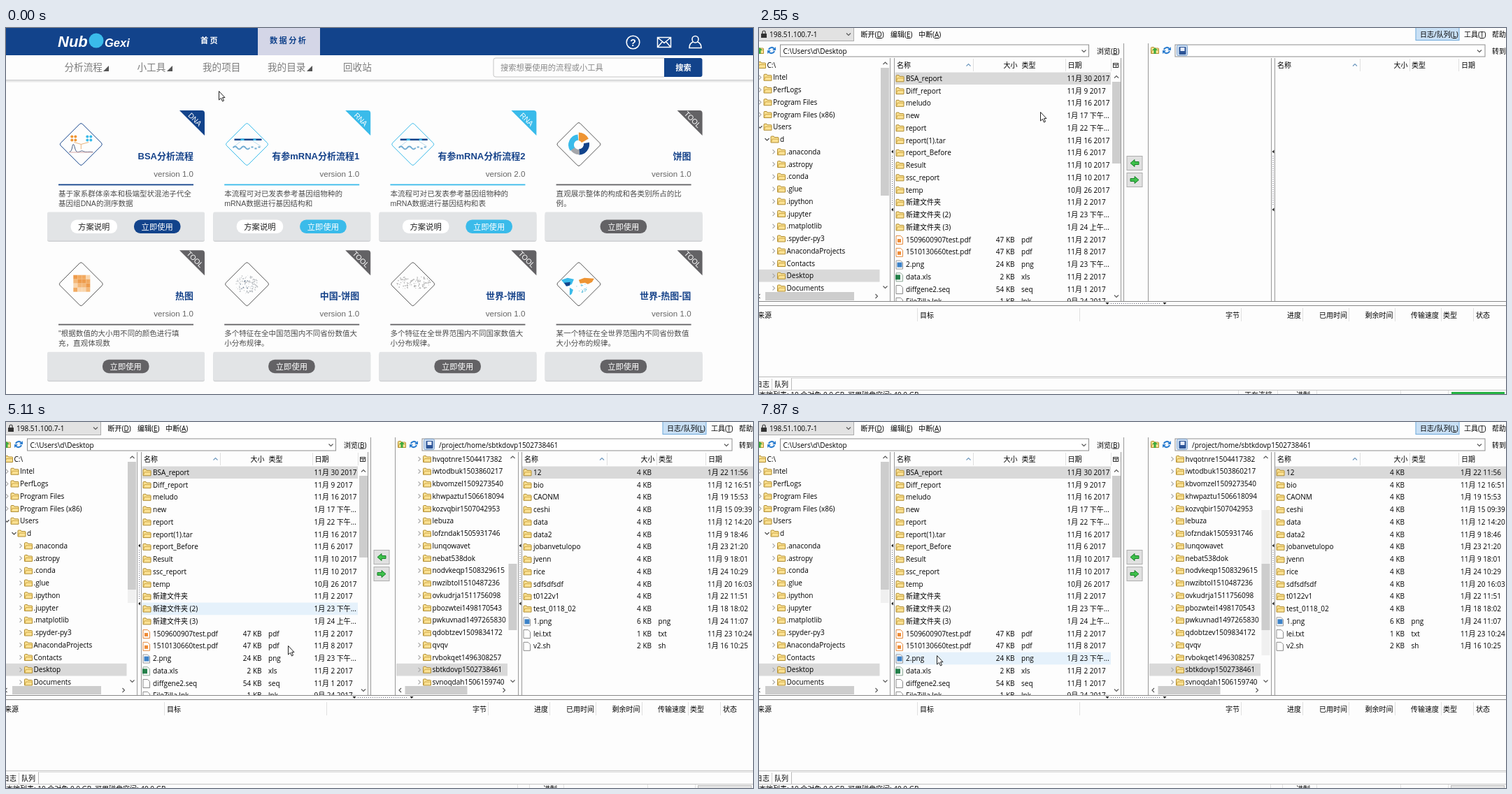
An HTML page for the animation above (8 s loop, 1068 by 524 pixels).

```html
<!DOCTYPE html>
<html lang="zh-CN">
<head>
<meta charset="utf-8">
<title>数据传输</title>
<style>
html, body { margin: 0; width: 100%; height: 100%; overflow: hidden; background: #fdfdfd; }
svg { display: block; width: 100vw; height: 100vh; }
text { white-space: pre; }
#portal { font-family: "Liberation Sans", "Noto Sans CJK SC", "Noto Sans CJK", sans-serif; }
#blank, #client { font: 10px "Open Sans", "Noto Sans CJK SC", "Noto Sans CJK", sans-serif; fill: #000; }
.end { text-anchor: end; }
.mid { text-anchor: middle; }
.key { text-decoration: underline; }
.tab { font-size: 11.2px; font-weight: 700; letter-spacing: 2.4px; }
.nav { font-size: 13.6px; fill: #7c7c7c; }
.logo { font-weight: 700; font-style: italic; fill: #fff; }
.title { font-size: 13px; font-weight: 700; fill: #16438a; text-anchor: end; }
.version { font-size: 11.6px; fill: #666; text-anchor: end; }
.desc { font-size: 10.55px; fill: #4c4c4c; }
.button { font-size: 11.3px; text-anchor: middle; }
.item { font-size: 13px; fill: #1b4a92; }
.badge { font-size: 10.5px; fill: #fff; text-anchor: middle; }
</style>
</head>
<body>
<svg id="stage" viewBox="0 0 1068 524" preserveAspectRatio="none"></svg>
<script>
const LOOP = 8000;
const NAVY = '#12438b', SKY = '#3abbea', GREY = '#636265', ORANGE = '#ee9433';
const EDGE = '#cfcfcf', THUMB = '#cdcdcd', SELECTED = '#d9d9d9', HOVER = '#e5f1fb';

// Markup helpers
const text = (x, y, s, cls = '', extra = '') => `<text x="${x}" y="${y}" class="${cls}" ${extra}>${s}</text>`;
const rect = (x, y, w, h, fill, extra = '') => `<rect x="${x}" y="${y}" width="${w}" height="${h}" fill="${fill}" ${extra}/>`;
const box = (x, y, w, h, fill, stroke, r = 0) => rect(x + .5, y + .5, w, h, fill, `stroke="${stroke}" rx="${r}"`);
const path = (d, stroke, width = 1, fill = 'none', extra = '') =>
  `<path d="${d}" fill="${fill}" stroke="${stroke}" stroke-width="${width}" ${extra}/>`;
const shape = (d, fill) => path(d, 'none', 0, fill);
const dotted = d => path(d, '#667', 1, 'none', 'stroke-dasharray="1 2"');
const dot = (x, y, r, fill) => `<circle cx="${x}" cy="${y}" r="${r}" fill="${fill}"/>`;
const vline = (x, y1, y2, color = EDGE) => rect(x, y1, 1, y2 - y1, color);
const hline = (x1, x2, y, color = EDGE) => rect(x1, y, x2 - x1, 1, color);
const move = (x, y, s) => `<g transform="translate(${x} ${y})">${s}</g>`;
const use = (id, x, y) => `<use href="#${id}" x="${x}" y="${y}"/>`;
const during = (on, off, s) => `<g data-on="${on}" data-off="${off}">${s}</g>`;
const range = n => [...Array(n).keys()];

function random(seed) {
  return () => (seed = (seed * 16807) % 2147483647) / 2147483647;
}

// Portal
function scatter(n, rx, ry, seed, color) {
  const next = random(seed);
  return range(n).map(() => {
    const a = next() * 6.283, r = Math.sqrt(next());
    return dot((rx * r * Math.cos(a)).toFixed(1), (ry * r * Math.sin(a)).toFixed(1), (.4 + next() * .6).toFixed(1), color);
  }).join('');
}

const quad = (x, color) => range(4).map(i => dot(x + i % 2 * 5, -11 + (i >> 1) * 5, 2, color)).join('');
const icons = {
  peak: () => quad(-13, ORANGE) + quad(9, SKY) +
    path('M-10-3 0 0 11-3M0 0V7', '#e8b27c') +
    path('M-17 11C-12 11-13 0-11 0S-9 11-5 11C0 11 0 8 3 10S12 10 17 11', '#4a6087') + hline(-17, 17, 11, '#d5a9a9'),
  strand: () => rect(-18, -8, 39, 2.5, NAVY) + rect(-9, -8, 5, 2.5, SKY) + rect(9, -8, 4, 2.5, SKY) +
    path('M-8-5-18 3M8-5 20 3', '#bcdcec') +
    path('M-20 5q3-4 6 0t6 0 6 0 6 0M6 4h3m2 2h3m2-2h3', '#71acd2', 2),
  pie: () => path('M11-2A11 11 0 0 1 0 11', NAVY, 8) + path('M1 11A11 11 0 0 1-9 6', '#a4a6aa', 7) +
    path('M-9 7A11 11 0 0 1-1-10', SKY, 8) + shape('M0 0V-17A17 17 0 0 1 14-8Z', ORANGE) + dot(-1, 0, 5.5, '#fdfdfd'),
  heat: () => range(16).map(i => rect(-11 + i % 4 * 6, -13 + (i >> 2) * 6, 6, 6,
    ['#ee9c4c', '#f4b878', '#f9d6ae', '#f2aa60'][(i * 7 + (i >> 2) * 3 + (i >> 1)) % 4])).join(''),
  region: () => scatter(95, 16, 14, 71, '#b8bcc0') + scatter(12, 11, 10, 8, '#65778d'),
  world: () => move(-13, -2, scatter(48, 10, 9, 14, '#b9b9b9')) + move(10, -2, scatter(80, 15, 9, 25, '#b5b5b5')),
  shaded: () => shape('M-25-6l9-3 9 2-3 7-6 3-5-4z', SKY) + shape('M-21-2l9-1-1 5-5 1z', NAVY) +
    shape('M-13 5l5 3-2 6-3 2z', SKY) + shape('M0-6l8-3 14 1-3 5-6 3-4-2-7 1z', ORANGE) +
    move(3, 5, scatter(16, 9, 7, 44, '#6cc4df')),
};

const cards = [
  ['DNA', 'BSA分析流程', '1.0', '基于家系群体亲本和极端型状混池子代全', '基因组DNA的测序数据', 'peak'],
  ['RNA', '有参mRNA分析流程1', '1.0', '本流程可对已发表参考基因组物种的', 'mRNA数据进行基因结构和', 'strand'],
  ['RNA', '有参mRNA分析流程2', '2.0', '本流程可对已发表参考基因组物种的', 'mRNA数据进行基因结构和表', 'strand'],
  ['TOOL', '饼图', '1.0', '直观展示整体的构成和各类别所占的比', '例。', 'pie'],
  ['TOOL', '热图', '1.0', '"根据数值的大小用不同的颜色进行填', '充，直观体现数', 'heat'],
  ['TOOL', '中国-饼图', '1.0', '多个特征在全中国范围内不同省份数值大', '小分布规律。', 'region'],
  ['TOOL', '世界-饼图', '1.0', '多个特征在全世界范围内不同国家数值大', '小分布规律。', 'world'],
  ['TOOL', '世界-热图-国', '1.0', '某一个特征在全世界范围内不同省份数值', '大小分布的规律。', 'shaded'],
];
const kindColor = { DNA: NAVY, RNA: SKY, TOOL: GREY };

function pill(x, label, fill, color) {
  return rect(x, 156.5, 66.5, 19.5, fill, 'rx="9"') + text(x + 33.2, 171, label, 'button', `fill="${color}"`);
}

function card([kind, title, version, line1, line2, icon], i) {
  const color = kindColor[kind], tool = kind === 'TOOL', half = tool ? 32 : 31;
  const buttons = tool ? pill(79, '立即使用', color, '#fff')
    : pill(33.5, '方案说明', '#fff', '#222') + pill(124, '立即使用', color, '#fff');
  const diamond = `M-2-${half - 2}q2-2 4 0L${half - 2}-2q2 2 0 4L2 ${half - 2}q-2 2-4 0L-${half - 2} 2q-2-2 0-4Z`;
  return move(59 + i % 4 * 237.2, 118 + (i >> 2) * 200.2,
    rect(0, 147, 225, 41, '#cfd1d3', 'rx="3"') + rect(0, 145.5, 225, 41, '#e2e4e6', 'rx="2"') +
    shape('M189 0H221q4 0 4 4V36Z', color) +
    text(211, 16.5, kind, 'badge', 'transform="rotate(45 211 13)"') +
    move(48.3, 48.5, path(diamond, tool ? '#555' : color) + icons[icon]()) +
    text(209, 70, title, 'title') + text(209, 95, 'version ' + version, 'version') +
    rect(16, 105.5, 193, 1.8, color) +
    text(16, 122.7, line1, 'desc') + text(16, 137.2, line2, 'desc') + buttons);
}

function portal() {
  const nav = [[83.5, '分析流程', 139], [187.5, '小工具', 230], [281, '我的项目'], [374, '我的目录', 430], [482, '回收站']];
  return rect(0, 0, 1068, 524, '#fdfdfd') +
    rect(0, 74, 1068, 1.5, '#cccdce') + rect(0, 75.5, 1068, 2, '#e8e8e8') +
    rect(0, 0, 1068, 39, NAVY) + rect(360, 0, 89, 39, '#d4d6e7') +
    text(74, 27, 'Nub', 'logo', 'font-size="22"') + dot(129, 18, 10.5, SKY) +
    text(141, 27, 'Gexi', 'logo', 'font-size="16.5"') +
    text(278, 22, '首页', 'tab', 'fill="#fff"') + text(377, 22, '数据分析', 'tab', `fill="${NAVY}"`) +
    `<circle cx="896.5" cy="20.5" r="9.3" fill="none" stroke="#fff" stroke-width="1.6"/>` +
    text(896.5, 25.5, '?', 'mid', 'fill="#fff" font-size="14" font-weight="700"') +
    path('M931.5 13.5h19v14h-19zl9.5 8 9.5-8M931.5 27.5l7-8M950.5 27.5l-7-8', '#fff', 1.5) +
    path('M981 16a4.5 4.5 0 1 1 9 0a4.5 5 0 1 1-9 0M982 20q-5 2-5 8.5h17q0-6.5-5-8.5', '#fff', 1.6) +
    nav.map(([x, s, tri]) => text(x, 61, s, 'nav') + (tri ? shape(`M${tri} 62h8v-8z`, '#555') : '')).join('') +
    box(696.5, 42.5, 246, 27, '#fdfdfd', '#c6c6c6', 3) +
    text(707, 60.5, '搜索想要使用的流程或小工具', '', 'font-size="11.3" fill="#888"') +
    shape('M941 43h51.5q3 0 3 3v21q0 3-3 3H941z', NAVY) +
    text(968.5, 60.7, '搜索', 'button', 'fill="#fff" font-weight="700"') +
    cards.map(card).join('') +
    during(850, 1490, rect(351, 77, 106, 65, '#bbb', 'rx="4"') + box(348.5, 74, 106, 65, '#fdfdfd', '#d4d4d4', 4) +
      text(376, 96, '查看文件', 'item') + text(376, 129, '数据传输', 'item'));
}

// Transfer client
const PITCH = 17.75;
const treeY = i => 53 + i * PITCH;
const fileY = i => 72.3 + i * PITCH;

const turns = { right: 0, down: 90, left: 180, up: 270 };
const turned = (x, y, dir, s) => `<g transform="translate(${x} ${y}) rotate(${turns[dir]})">${s}</g>`;
const chevron = (x, y, dir, color = '#555') => turned(x, y, dir, path('M-1.5-3 1.5 0-1.5 3', color, 1.1));
const triangle = (x, y, dir) => turned(x, y, dir, shape('M-1.5-2.5 1.5 0-1.5 2.5Z', '#222'));

function treeRow(x, i, name, arrow = 'right') {
  const y = treeY(i);
  return chevron(x - 5, y, arrow, arrow === 'right' ? '#aaa' : '#444') + use('folder', x, y - 5) + text(x + 13.5, y + 3.6, name);
}

function fileRow(cols, [name, size, date], i) {
  const ext = name.split('.').pop(), y = fileY(i);
  const icon = size && name.includes('.') ? { pdf: 'pdf', png: 'png', xls: 'xls' }[ext] || 'doc' : 'folder';
  const type = icon === 'folder' ? '' : ext;
  return use(icon, cols.icon, y - (icon === 'folder' ? 5 : 6)) + text(cols.icon + 14.5, y + 3.6, name) +
    text(cols.size, y + 3.6, size ? size + ' KB' : '', 'end') + text(cols.type, y + 3.6, type) + text(cols.date, y + 3.6, date);
}

const parseRows = s => s.trim().split('\n').map(line => line.trim().split('|'));
const localFiles = parseRows(`BSA_report||11月 30 2017
  Diff_report||11月 9 2017
  meludo||11月 16 2017
  new||1月 17 下午...
  report||1月 22 下午...
  report(1).tar||11月 16 2017
  report_Before||11月 6 2017
  Result||11月 10 2017
  ssc_report||11月 10 2017
  temp||10月 26 2017
  新建文件夹||11月 2 2017
  新建文件夹 (2)||1月 23 下午...
  新建文件夹 (3)||1月 24 上午...
  1509600907test.pdf|47|11月 2 2017
  1510130660test.pdf|47|11月 8 2017
  2.png|24|1月 23 下午...
  data.xls|2|11月 2 2017
  diffgene2.seq|54|11月 1 2017
  FileZilla.lnk|1|9月 24 2017`);
const remoteFiles = parseRows(`12|4|1月 22 11:56
  bio|4|11月 12 16:51
  CAONM|4|1月 19 15:53
  ceshi|4|11月 15 09:39
  data|4|11月 12 14:20
  data2|4|11月 9 18:46
  jobanvetulopo|4|1月 23 21:20
  jvenn|4|11月 9 18:01
  rice|4|1月 24 10:29
  sdfsdfsdf|4|11月 20 16:03
  t0122v1|4|1月 22 11:51
  test_0118_02|4|1月 18 18:02
  1.png|6|1月 24 11:07
  lei.txt|1|11月 23 10:24
  v2.sh|2|1月 16 10:25`);
const folders = `.anaconda .astropy .conda .glue .ipython .jupyter .matplotlib .spyder-py3
  AnacondaProjects Contacts Desktop Documents`.split(/\s+/);
const account = 'sbtkdovp1502738461';
const accounts = `hvqotnre1504417382 iwtodbuk1503860217 kbvomzel1509273540 khwpaztu1506618094 kozvqbir1507042953
  lebuza lofzndak1505931746 lunqowavet nebat538dok nodvkeqp1508329615 nwzibtol1510487236 ovkudrja1511756098
  pbozwtei1498170543 pwkuvnad1497265830 qdobtzev1509834172 qvqv rvbokqet1496308257 ${account} svnoqdah1506159740`.split(/\s+/);
const localCols = { icon: 195.5, size: 365.5, type: 375, date: 440.5 };
const remoteCols = { icon: 739.5, size: 923, type: 932.5, date: 1003 };

const menu = (x, y, label, key) => text(x, y, `${label}(<tspan class="key">${key}</tspan>)`);
const hover = (x, w, row, on, off) => during(on, off, rect(x, fileY(row) - 9, w, PITCH, HOVER));
const handle = x => triangle(x, 177, 'left') + triangle(x, 260, 'left') + dotted(`M${x} 183V255`);
const headers = (xs, y) => xs.map(([x, s, end]) => text(x, y, s, end ? 'end' : '')).join('');
const columns = (xs, y1, y2) => xs.map(x => vline(x, y1, y2, '#e0e0e0')).join('');

function toolbar() {
  return box(-2, -2, 137, 20, '#e2e2e2', '#adadad') + rect(3, 8, 8, 6, '#333') + path('M5 8V6a2 2 0 0 1 4 0v2', '#333', 1.2) +
    text(15, 13, '198.51.100.7-1') + chevron(128, 9, 'down') +
    menu(145.5, 13, '断开', 'D') + menu(188, 13, '编辑', 'E') + menu(228, 13, '中断', 'A') +
    box(938.5, -1, 62, 18, '#c9e0f5', '#6fa9db') + menu(945, 13, '日志/队列', 'L') +
    menu(1008, 13, '工具', 'T') + text(1048, 13, '帮助') +
    use('up', -5, 27) + use('refresh', 18, 32) + box(30, 23.5, 441, 17, '#fff', '#8d8d8d') +
    text(34.5, 36.5, 'C:\\Users\\d\\Desktop') + chevron(464.5, 33, 'down') + menu(483, 36.5, '浏览', 'B') +
    use('up', 560, 27) + use('refresh', 583, 32) + box(594.5, 23.5, 443, 17, '#fff', '#8d8d8d') +
    box(597, 24, 15, 15, '#cfe0f2', '#7da2ce', 2) + rect(600.5, 27, 10, 11, '#2d5597', 'rx="1"') + rect(602.5, 28, 6, 5, '#e8eefc') +
    chevron(1030, 33, 'down') + text(1048, 36.5, '转到');
}

function localTree() {
  return rect(0, treeY(17) - 9, 172.5, PITCH, SELECTED) +
    treeRow(-2, 0, 'C:\\', 'down') +
    ['Intel', 'PerfLogs', 'Program Files', 'Program Files (x86)'].map((s, i) => treeRow(6.5, i + 1, s)).join('') +
    treeRow(6.5, 5, 'Users', 'down') + treeRow(16.5, 6, 'd', 'down') +
    folders.map((s, i) => treeRow(26, i + 7, s)).join('') +
    rect(0, 378, 187, 13, '#fdfdfd') + rect(9, 378, 127, 12, THUMB) + chevron(0, 384, 'left') + chevron(168, 384, 'right') +
    during(4270, LOOP, rect(174, 240, 12, 19, '#f0f0f0')) +
    rect(174, 57, 12, 183, THUMB) + chevron(180.5, 50.5, 'up') + chevron(180.5, 371, 'down');
}

function localList() {
  const bar = (row, on, off) => hover(194.5, 308.5, row, on, off);
  return headers([[197, '名称'], [369.5, '大小', 1], [375.5, '类型'], [441.5, '日期']], 57) +
    chevron(299.5, 53, 'up', '#6b96bd') + columns([306, 438, 503], 44, 62) +
    box(506, 50, 7, 6, '#fff', '#333') + path('M507 52.5h7M510.5 52v5', '#333') +
    rect(505, 77, 12, 117, THUMB) + chevron(511, 70, 'up') + chevron(511, 384, 'down') +
    during(2550, LOOP, rect(194.5, 63.5, 308.5, 17.5, SELECTED) +
      bar(4, 3630, 4060) + bar(11, 4900, 5330) + bar(15, 7030, 7240) + bar(16, 7240, 7870) + bar(15, 7870, LOOP) +
      `<g clip-path="url(#panes)">${localFiles.map((row, i) => fileRow(localCols, row, i)).join('')}</g>`);
}

function remotePanes() {
  const bar = (row, on, off) => hover(738, 330, row, on, off);
  return headers([[741, '名称'], [927.5, '大小', 1], [933, '类型'], [1004, '日期']], 57) +
    chevron(852, 53, 'up', '#6b96bd') + columns([859, 930, 1000], 44, 62) +
    during(3420, 4270, text(619, 36.5, '/project/home') + rect(558, treeY(2) - 9, 172.5, PITCH, SELECTED) +
      treeRow(567.5, 0, '/', 'down') + treeRow(576.5, 1, 'project', 'down') + treeRow(586, 2, 'home')) +
    during(4270, LOOP, text(619, 36.5, '/project/home/' + account) +
      rect(558, treeY(17) - 9, 159, PITCH, SELECTED) +
      accounts.map((s, i) => treeRow(596, i, s)).join('') +
      during(5540, LOOP, rect(718.5, 126, 12, 208, '#f0f0f0')) +
      rect(718.5, 203, 12, 95, THUMB) + chevron(724.5, 50.5, 'up') + chevron(724.5, 371, 'down') +
      rect(558, 378, 172, 13, '#fdfdfd') + rect(570.5, 378, 89, 12, THUMB) +
      chevron(563.5, 384, 'left') + chevron(712, 384, 'right') +
      rect(738, 63.5, 330, 17.5, SELECTED) +
      bar(13, 5750, 5960) + bar(9, 5960, 6180) + bar(6, 6180, 6610) +
      remoteFiles.map((row, i) => fileRow(remoteCols, row, i)).join(''));
}

function queue() {
  const local = '本地列表: 10 个对象 0.0 GB, 可用磁盘空间: 40.0 GB', remote = '远端列表: 15 个对象 54.0 KB';
  return headers([[-2, '来源'], [230, '目标'], [687, '字节', 1], [775, '进度', 1], [841, '已用时间', 1],
    [906.5, '剩余时间', 1], [972, '传输速度', 1], [978, '类型'], [1025, '状态']], 414.5) +
    columns([226, 458, 689, 777, 843, 909, 975, 1021], 401, 420) +
    hline(0, 1068, 499, '#bbb') + hline(46, 1068, 501, '#ddd') + hline(0, 1068, 518, '#c4c4c4') +
    vline(18, 502, 518, '#ccc') + vline(46, 501, 518, '#bbb') + text(-5, 513.7, '日志') + text(22, 514, '队列') +
    during(2340, 5330, text(0, 529, local)) + during(5330, 6820, text(0, 529, remote)) + during(6820, LOOP, text(0, 529, local)) +
    during(2340, 4270, columns([685, 741], 519, 524) + text(694, 529, '正在连接') + rect(990, 521, 76, 3, '#25b343')) +
    during(4270, LOOP, columns([731, 748], 519, 524) + box(989, 520, 76, 8, '#e6e6e6', '#bcbcbc')) +
    text(768, 529, '进制') + columns([797, 917, 985], 519, 524);
}

function client() {
  const frames = [187, 193, 517, 732, 737].map(x => vline(x, 43, 391, '#999')).join('') +
    [521, 556].map(x => vline(x, 22, 391, '#999')).join('');
  const transfer = (y, dir) => box(525.5, y, 22, 20, '#e1e1e1', '#adadad') +
    turned(537, y + 10.5, dir, path('M6 0 0-5v3h-6v4H0v3z', '#168127', 1, '#3fc14c'));
  return rect(0, 0, 1068, 524, '#fdfdfd') + toolbar() + localTree() + localList() + remotePanes() + frames +
    rect(0, 391, 1068, 7, '#fdfdfd') + hline(0, 1068, 391, '#888') + hline(0, 1068, 397, '#888') +
    handle(190.5) + handle(735) + triangle(498, 394.5, 'down') + triangle(580, 394.5, 'down') + dotted('M503 394.5H575') +
    transfer(183, 'left') + transfer(207, 'right') + queue();
}

const blank = rect(0, 0, 1068, 524, '#fdfdfd') + hline(0, 532, 518, '#d0d0d0') + vline(531, 518, 524, '#d0d0d0') +
  text(0, 530.5, 'for an idle session of the data link channel, the local host will load', '', 'font-size="9.5" fill="#777"');

const page = 'M.5.5h6.5l3 3v9h-9.5z';
const defs = `<defs>
  <clipPath id="panes"><rect width="1068" height="391"/></clipPath>
  <g id="folder">${path('M.5 9.5V1.5q0-1 1-1h3l1 1.5h5q1 0 1 1V9.5z', '#b08c30', 1, '#fbe193') + path('M1 9 2.5 4.5H12', '#cfa948')}</g>
  <g id="doc">${path(page, '#8a8a8a', 1, '#fff')}</g>
  <g id="pdf">${path(page, '#e58a3c', 1, '#fff') + rect(2.5, 5, 5, 5, '#ef8b36')}</g>
  <g id="png">${path(page, '#999', 1, '#fff') + rect(2, 3, 7, 7, '#3c82c8')}</g>
  <g id="xls">${path(page, '#8aa694', 1, '#fff') + rect(-.5, 3, 7, 7, '#23804a')}</g>
  <g id="up">${use('folder', 0, 0) + shape('M6 1 10 5H7.5V10h-3V5H2z', '#3caa3c')}</g>
  <g id="refresh">${path('M-4-1A4.5 4.5 0 0 1 4-2M4 1A4.5 4.5 0 0 1-4 2', '#2f7fd0', 2.2) + shape('M6-5V0H1zM-6 5V0h5z', '#2f7fd0')}</g>
</defs>`;

const arrowCursor = path('M.5.5V13l3-2.7 2 4.7 2-1-2-4.4h3.5z', '#222', 1, '#fff');
const handCursor = path('M-1-7q0-1.5 1.2-1.5T1.5-7v5l6 1.2q1.5.5 1.5 2V5l-1.5 4H0L-4.5 2q-.5-2 1.5-1.5L-1 2z', '#222', 1, '#fff');

const stage = document.getElementById('stage');
stage.innerHTML = defs +
  `<g id="portal" data-on="0" data-off="1490">${portal()}</g>` +
  `<g id="blank" data-on="1490" data-off="2340">${blank}</g>` +
  `<g id="client" data-on="2340" data-off="${LOOP}">${client()}</g>` +
  `<g id="cursor">${during(0, 850, arrowCursor) + during(850, 1490, handCursor) + during(1490, LOOP, arrowCursor)}</g>`;

// Pointer positions, each held until the next: time, x, y
const pointer = [
  [0, 304, 90], [430, 262, 72], [640, 336, 62], [850, 405, 62], [1060, 402, 93], [1280, 403, 122],
  [1490, 402, 120], [3420, 360, 112], [3630, 310, 138], [3850, 300, 99], [4060, 600, 220], [4270, 915, 345],
  [4480, 760, 335], [4690, 600, 300], [4900, 470, 266], [5110, 403, 320], [5330, 640, 260],
  [5540, 712, 250], [5750, 800, 300], [5960, 850, 232], [6180, 810, 182], [6390, 773, 166],
  [6610, 650, 200], [6820, 480, 280], [7030, 380, 334], [7240, 300, 352], [7450, 270, 358], [7660, 262, 352], [7870, 254, 334],
];
const timed = [...stage.querySelectorAll('[data-on]')];
const cursor = document.getElementById('cursor');
const start = performance.now();

function draw() {
  const t = (performance.now() - start) % LOOP;
  for (const el of timed) {
    el.style.display = t >= +el.dataset.on && t < +el.dataset.off ? '' : 'none';
  }
  const [, x, y] = pointer.findLast(([at]) => at <= t);
  cursor.setAttribute('transform', `translate(${x} ${y})`);
  requestAnimationFrame(draw);
}
draw();
</script>
</body>
</html>
```
